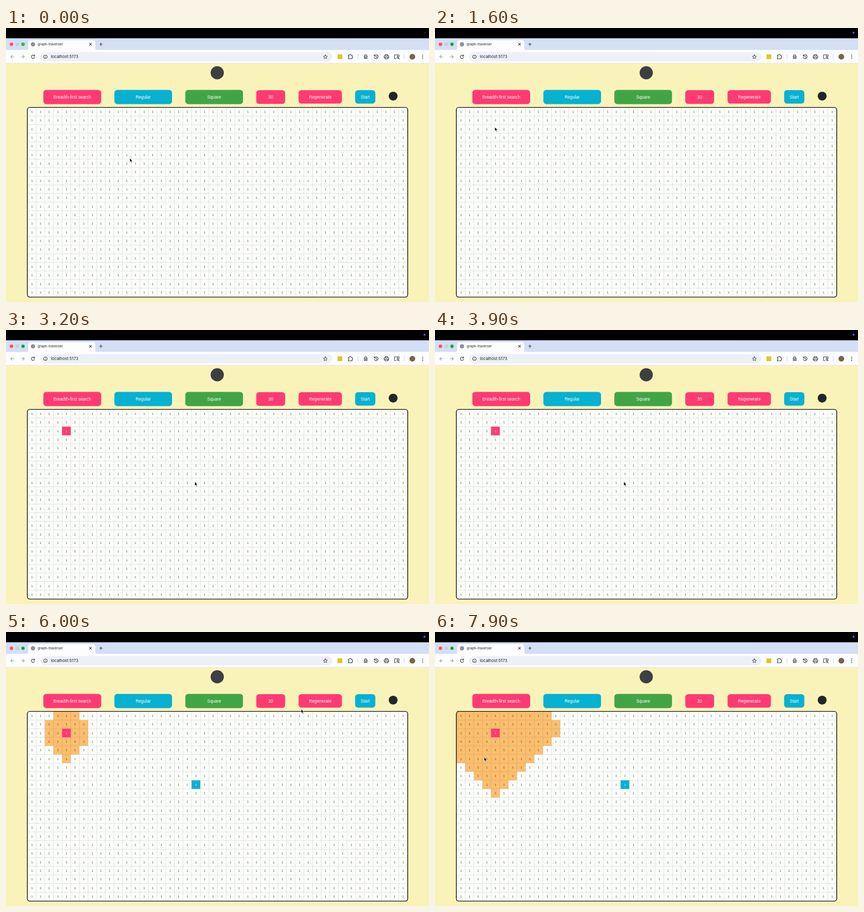
Write an HTML page that moves like this. It is 800 by 520 pixels and loops after 8000 ms.

```html
<!DOCTYPE html>
<html lang="en">
<head>
<meta charset="utf-8">
<title>graph-traverser</title>
<style>
  html, body { margin: 0; width: 100%; height: 100%; overflow: hidden; background: #faf3b9; }
  svg { display: block; width: 800px; height: 520px; }
  .ui { font-family: Inter, "Open Sans", sans-serif; fill: #1f2023; }
  .label { font: 8.2px "Liberation Sans", Arial, sans-serif; fill: #fff; text-anchor: middle; }
  .weight { font: 5.6px "Liberation Sans", Arial, sans-serif; fill: #3f4a42; text-anchor: middle; }
  .white { fill: #fff; }
  .icon { fill: none; stroke: #3f4247; stroke-width: 1.1; stroke-linecap: round; stroke-linejoin: round; }
  .faint { stroke: #a3a6ad; }
</style>
</head>
<body>
<svg id="stage" viewBox="0 0 800 520">
  <rect width="800" height="520" fill="#faf3b9"/>
  <rect width="800" height="20" fill="#000"/>
  <circle id="indicator" cx="791.5" cy="9" r="2" fill="#5b56d6"/>

  <!-- browser chrome -->
  <rect y="19.5" width="800" height="24" fill="#d4def5"/>
  <path d="M38 42Q42 42 42 38V28Q42 23 47 23H164Q169 23 169 28V38Q169 42 173 42Z" fill="#fdfdff"/>
  <rect y="41.5" width="800" height="25.5" fill="#fdfdff"/>
  <rect y="66.5" width="800" height=".8" fill="#dfe1e6"/>
  <circle cx="10.3" cy="30.8" r="3.4" fill="#fb5a54"/>
  <circle cx="21.3" cy="30.8" r="3.4" fill="#c9cdd6"/>
  <circle cx="32.2" cy="30.8" r="3.4" fill="#28c043"/>
  <circle id="hover" cx="32.2" cy="30.8" r="1.5" fill="#0d7a24"/>
  <circle cx="51" cy="31" r="4" fill="#8d9199"/>
  <text class="ui" x="60" y="33.2" font-size="6.4">graph-traverser</text>
  <g class="icon">
    <path d="M157.8 28.8l4 4m0-4l-4 4M179.5 28v5.4m-2.7-2.7h5.4"/>
    <path class="faint" d="M15 54.5H9.2m2.6-2.8l-2.8 2.8l2.8 2.8M28.7 54.5h5.8m-2.6-2.8l2.8 2.8l-2.8 2.8"/>
    <path d="M53.6 52.8A3.1 3.1 0 1 0 54 55.6M54 50.8v2.4h-2.4"/>
  </g>
  <rect x="65" y="45.8" width="552" height="17.4" rx="8.7" fill="#edf0f9"/>
  <circle cx="74.6" cy="54.5" r="6.6" fill="#fdfdff"/>
  <g class="icon">
    <circle cx="74.6" cy="54.5" r="3.3"/>
    <path d="M74.6 54.3v1.7m0-3.2v.1" stroke-width=".9"/>
    <path d="M604 50.7l1.1 2.5l2.7.3l-2 1.8l.6 2.7l-2.4-1.4l-2.4 1.4l.6-2.7l-2-1.8l2.7-.3Z" stroke-width=".9"/>
    <path d="M647.5 51.5h2.2q0-1.5 1.3-1.5t1.3 1.5h2.2v2.2q1.3 0 1.3 1.2t-1.3 1.2v2.4h-7v-2.3q1.4 0 1.4-1.2t-1.4-1.2Z"/>
    <path d="M676.8 54.2h7M678 53.8l.6-2.7h3.4l.6 2.7"/>
    <circle cx="678.6" cy="57" r="1.2"/><circle cx="682" cy="57" r="1.2"/>
    <path d="M696.8 52.6A3.7 3.7 0 1 1 696.5 55.6M696.3 50.8v2.2h2.2M700 52.5v2.3l1.6 1"/>
    <path d="M717 53v-2.4h5V53M716.8 56.8h-1.6V53h8.6v3.8h-1.6M717 55.5h5v3h-5Z"/>
    <path d="M738 58h-3.2v-7h8.6v3M740.2 51v2.8"/>
    <circle cx="741.2" cy="56" r="1.6"/><path d="M742.4 57.2l1.4 1.4"/>
  </g>
  <rect x="627" y="50" width="9" height="9" fill="#dfc52d"/>
  <path d="M665.7 50v9M753.2 50v9" stroke="#c8d3ee"/>
  <circle cx="768.5" cy="54.5" r="5.4" fill="#75664a"/>
  <g fill="#3f4247"><circle cx="788" cy="51.3" r=".9"/><circle cx="788" cy="54.5" r=".9"/><circle cx="788" cy="57.7" r=".9"/></g>
  <text class="ui" x="85" y="57.3" font-size="7.7">localhost:5173</text>

  <!-- page header -->
  <circle cx="399.5" cy="85" r="12.5" fill="#3c4044"/>
  <g id="buttons"></g>
  <circle cx="732.2" cy="129.3" r="8.4" fill="#22262b"/>

  <!-- board -->
  <rect x="40.4" y="150.6" width="719.3" height="360" rx="4.5" fill="#fdfefc"/>
  <clipPath id="inside"><rect x="40.4" y="150.6" width="719.3" height="360" rx="4.5"/></clipPath>
  <g clip-path="url(#inside)">
    <path id="visited" fill="#fdbe6d"/>
    <path id="lines" stroke="#6f8a76" stroke-opacity=".27" stroke-width=".8"/>
  </g>
  <g id="weights"></g>
  <g id="source"></g>
  <g id="goal"></g>
  <rect x="40.4" y="150.6" width="719.3" height="360" rx="4.5" fill="none" stroke="#111" stroke-width="1.4"/>

  <path id="cursor" d="M0 0V7.6L1.8 6L3.1 9L4.5 8.4L3.2 5.5H5.5Z" fill="#000" stroke="#fff" stroke-width=".7"/>
</svg>
<script>
const $ = id => document.getElementById(id);
const PINK = '#ff3a73', CYAN = '#06b1d2', GREEN = '#41a546';
const COLS = 44, ROWS = 22, SIZE = 16.33, LEFT = 40.8, TOP = 150.8;
const LOOP = 8000, STEP = 100;
const SOURCE = [4, 2], GOAL = [19, 8];
const SOURCE_AT = 1900, GOAL_AT = 4200, SEARCH_AT = 5300, VISIT_MS = 32.3;

const colX = c => LEFT + c * SIZE;
const rowY = r => TOP + r * SIZE;
const range = n => Array.from({ length: n }, (_, i) => i);

function button(x, y, w, h, fill, label) {
  return `<rect x="${x}" y="${y}" width="${w}" height="${h}" rx="5.5" fill="${fill}"/>
    <text class="label" x="${x + w / 2}" y="133.9">${label}</text>`;
}

function weightRow(r) {
  const xs = range(COLS).map(c => (colX(c) + SIZE / 2).toFixed(2)).join(' ');
  return `<text class="weight" x="${xs}" y="${rowY(r) + 10.2}">${'1'.repeat(COLS)}</text>`;
}

function marker([c, r], fill) {
  return `<rect x="${colX(c)}" y="${rowY(r)}" width="${SIZE}" height="${SIZE}" fill="${fill}"/>
    <text class="weight white" x="${colX(c) + SIZE / 2}" y="${rowY(r) + 10.2}">1</text>`;
}

$('buttons').innerHTML =
  button(70.6, 117.4, 109.4, 27, PINK, 'Breadth-first search') +
  button(205, 117.4, 109, 27, CYAN, 'Regular') +
  button(339.2, 117.4, 109, 27, GREEN, 'Square') +
  button(473.3, 118, 54.6, 26, PINK, '30') +
  button(553.3, 118, 82, 25.6, PINK, 'Regenerate') +
  button(660.3, 118, 38.2, 25.6, CYAN, 'Start');
$('weights').innerHTML = range(ROWS).map(weightRow).join('');
$('source').innerHTML = marker(SOURCE, PINK);
$('goal').innerHTML = marker(GOAL, CYAN);
$('lines').setAttribute('d',
  range(COLS - 1).map(c => `M${colX(c + 1)} 151V510`).join('') +
  range(ROWS - 1).map(r => `M41 ${rowY(r + 1)}H759`).join(''));

// Cells in breadth-first order: up, down, left, right.
function search() {
  const queue = [SOURCE], seen = new Set([SOURCE.join()]);
  for (const [c, r] of queue) {
    for (const [dc, dr] of [[0, -1], [0, 1], [-1, 0], [1, 0]]) {
      const next = [c + dc, r + dr], key = next.join();
      const inside = next[0] >= 0 && next[0] < COLS && next[1] >= 0 && next[1] < ROWS;
      if (inside && !seen.has(key)) { seen.add(key); queue.push(next); }
    }
  }
  return queue;
}
const order = search();

// Pointer stops: time, x, y.
const stops = [
  [0, 234, 247], [200, 234, 247], [1300, 113, 188], [2000, 113, 188],
  [2600, 302, 220], [3200, 357, 288], [4300, 357, 288], [5000, 660, 124.5],
  [5200, 673, 129], [5600, 673, 129], [6800, 229.8, 196], [7900, 93, 237.5]
];

function pointer(t) {
  const i = stops.findIndex(s => s[0] > t);
  if (i < 0) return stops[stops.length - 1].slice(1);
  const [t0, x0, y0] = stops[i - 1], [t1, x1, y1] = stops[i];
  const p = (t - t0) / (t1 - t0), e = p * p * (3 - 2 * p);
  return [x0 + (x1 - x0) * e, y0 + (y1 - y0) * e];
}

const show = (id, on) => $(id).setAttribute('visibility', on ? 'visible' : 'hidden');

function render(t) {
  const count = t < SEARCH_AT ? 0 : 1 + Math.floor((t - SEARCH_AT) / VISIT_MS);
  $('visited').setAttribute('d', order.slice(0, count)
    .map(([c, r]) => `M${colX(c)} ${rowY(r)}h${SIZE}v${SIZE}h${-SIZE}z`).join(''));
  show('source', t >= SOURCE_AT);
  show('goal', t >= GOAL_AT);
  show('hover', t >= STEP);
  $('indicator').setAttribute('opacity', t >= STEP ? 1 : 0.25);
  $('cursor').setAttribute('transform', `translate(${pointer(t).join()})`);
}

const begin = performance.now();
function tick() {
  const t = (performance.now() - begin) % LOOP;
  render(Math.floor(t / STEP) * STEP);
  requestAnimationFrame(tick);
}
tick();
</script>
</body>
</html>
```
